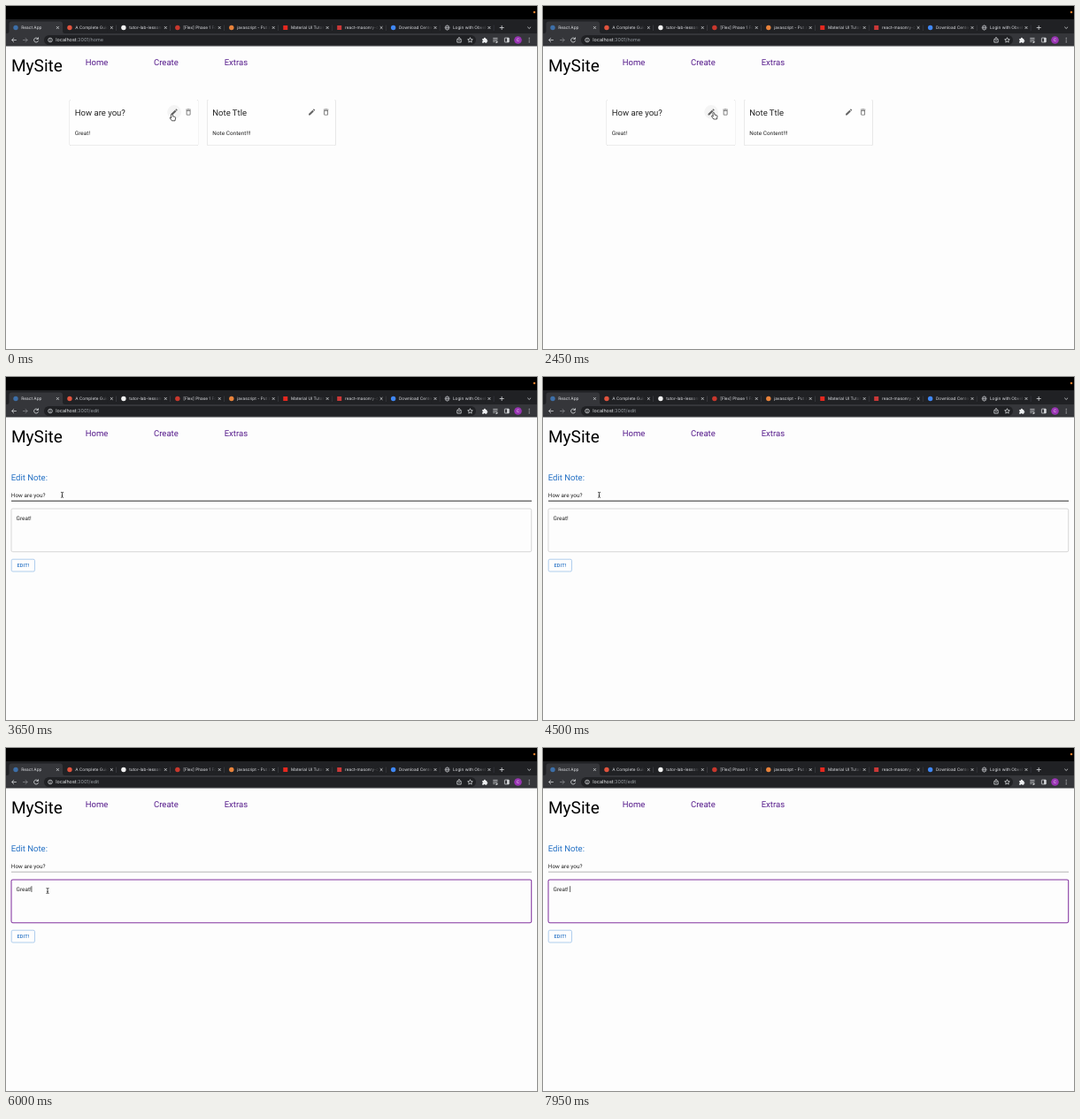
Animation of 600x388 px, one loop 8 s. Source, as an HTML page:

```html
<!DOCTYPE html>
<html lang="en">
<head>
<meta charset="utf-8">
<title>Notes</title>
<style>
  html, body { margin: 0; width: 100%; height: 100%; overflow: hidden; background: #fdfdfd; }
  svg { display: block; width: 600px; height: 388px; }
  text { font-family: Roboto, sans-serif; text-rendering: geometricPrecision; white-space: pre; }
  .ui { font-family: Inter, sans-serif; }
  .body { font-size: 6.35px; letter-spacing: .06px; fill: #222; }
  .line { fill: none; stroke: #d5d7da; stroke-width: .8; }
  .card { fill: #fefefe; filter: drop-shadow(0 .6px .45px rgba(0, 0, 0, .38)); }
</style>
</head>
<body>
<svg id="stage" viewBox="0 0 600 388">
  <defs>
    <linearGradient id="fade">
      <stop offset="0" stop-color="#202124" stop-opacity="0"/>
      <stop offset="1" stop-color="#202124"/>
    </linearGradient>
    <path id="pencil" transform="scale(.397) translate(-12 -12)" d="M3 17.25V21h3.75L17.81 9.94l-3.75-3.75L3 17.25zM20.71 7.04a1 1 0 0 0 0-1.41l-2.34-2.34a1 1 0 0 0-1.41 0l-1.83 1.83 3.75 3.75 1.83-1.83z"/>
    <path id="trash" transform="scale(.397) translate(-12 -12)" d="M6 19c0 1.1.9 2 2 2h8c1.1 0 2-.9 2-2V7H6v12zM8 9h8v10H8V9zm7.5-5l-1-1h-5l-1 1H5v2h14V4z"/>
    <path id="cross" d="M-1.4-1.4 1.4 1.4M1.4-1.4-1.4 1.4"/>
  </defs>

  <rect width="600" height="388" fill="#fdfdfd"/>
  <rect width="600" height="45.5" fill="#35363a"/>
  <rect width="600" height="31" fill="#202124"/>
  <rect width="600" height="15" fill="#000"/>
  <circle cx="597" cy="7" r="1.3" fill="#d9792b"/>
  <path d="M1 31Q3.5 31 3.5 28.5V20.5Q3.5 17.5 6.5 17.5H61Q64 17.5 64 20.5V28.5Q64 31 66.500 31Z" fill="#35363a"/>
  <g id="tabs"></g>
  <path class="line" d="M557.700 24.500h5M560.200 22v5M589.300 23.700l1.900 1.800 1.900-1.800"/>

  <g class="line">
    <path d="M11.800 38.500H6.700M9 36.100 6.600 38.500 9 40.900"/>
    <path d="M19 38.500h5.100M21.800 36.100l2.400 2.400-2.400 2.400" stroke="#85878b"/>
    <path d="M36 36.900a2.500 2.500 0 1 0 .5 2.300M36.500 35.400v2.100h-2.100"/>
  </g>
  <rect x="43" y="33" width="488" height="11" rx="5.500" fill="#202124"/>
  <g class="line" stroke-width=".7">
    <circle cx="50" cy="38.500" r="2.300"/>
    <path d="M50 38.100v1.700M50 36.900v.6"/>
    <path d="M511 37.500h-1.200v3.600h4.400v-3.600H513M512 39.700v-4.200M510.800 36.600l1.200-1.200 1.200 1.200"/>
    <path d="m524.500 35.700.8 1.900 2 .2-1.500 1.300.4 2-1.700-1-1.700 1 .4-2-1.500-1.300 2-.2z"/>
    <path d="M550.300 36.400h5.200M550.300 38.300h5.200M550.300 40.200h2.400"/>
    <rect x="563.400" y="36.100" width="4.800" height="4.800" rx=".4"/>
  </g>
  <path d="M553.600 39.200l2.600 1.500-2.600 1.500zM566.100 36h2.300v5h-2.300z" fill="#d5d7da"/>
  <path d="M538.200 37h1.700a1.050 1.050 0 1 1 2 0h1.400v1.500a1 1 0 1 1 0 2v1.300h-1.700a1 1 0 0 0-1.900 0h-1.500v-1.700a1 1 0 0 0 0-1.800z" fill="#eceef0"/>
  <circle cx="578.500" cy="38.500" r="4.300" fill="#9a35b4"/>
  <text class="ui" x="578.500" y="40.200" font-size="4.700" text-anchor="middle" fill="#f4e6f8">C</text>
  <path d="M591.200 36.300v.01M591.200 38.500v.01M591.200 40.700v.01" stroke="#d5d7da" stroke-width="1.200" stroke-linecap="round"/>
  <text class="ui" x="56.300" y="40.400" font-size="5.450" fill="#eceef0">localhost<tspan fill="#9aa0a6">:3001/<tspan id="route"></tspan></tspan></text>

  <text x="6" y="73.500" font-size="19.050">MySite</text>
  <g font-size="9.520" fill="#551a8b">
    <text x="89.700" y="67.300">Home</text>
    <text x="167" y="67.300">Create</text>
    <text x="246.700" y="67.300">Extras</text>
  </g>

  <g id="home">
    <circle id="hover" cy="120" r="7.900" fill="#000" fill-opacity=".04"/>
  </g>

  <g id="edit">
    <text x="5.800" y="117.200" font-size="9.520" fill="#2370c4">Edit Note:</text>
    <text class="body" x="5.800" y="136.400">How are you?</text>
    <path id="rule" d="M6 140.200H594"/>
    <rect id="box" x="6" y="149" width="587.700" height="48.700" rx="1.600" fill="none"/>
    <text class="body" x="11.500" y="162">Great!</text>
    <path id="caret" d="M0 156.200v6.800" stroke="#222" stroke-width=".7"/>
    <rect x="6.200" y="206.200" width="26.300" height="13.800" rx="1.600" fill="none" stroke="#8fb9e6" stroke-width=".7"/>
    <text x="19.400" y="214.900" font-size="5.560" font-weight="500" letter-spacing=".16" text-anchor="middle" fill="#2370c4">EDIT!</text>
  </g>

  <g id="cursor">
    <path id="hand" d="M-1.100.8Q-1-.2-.2-.2Q.5-.2.7.7L1 2.400 3.200 2.900Q4.200 3.200 4 4.200L3.400 7.300H-.2L-2.300 4.400Q-2.700 3.400-1.700 3.400L-.7 4.200Z" fill="#fff" stroke="#111" stroke-width=".7" stroke-linejoin="round"/>
    <path id="arrow" d="M0 0V6L1.400 4.800 2.300 6.900 3.400 6.400 2.500 4.400H4.300Z" fill="#000" stroke="#fff" stroke-width=".5"/>
    <path id="beam" d="M-1.500-3Q0-3 0-2.200Q0-3 1.500-3M0-2.300V2.300M-1.500 3Q0 3 0 2.200Q0 3 1.500 3M-.8.8H.8" fill="none" stroke="#111" stroke-width=".7"/>
  </g>
</svg>
<script>
const LOOP = 8000;
const OPEN_EDIT = 2800, FOCUS = 5650, TYPE_SPACE = 7600;
const $ = id => document.getElementById(id);

// title, icon colour, icon shape
const tabs = [
  ['React App', '#3d6fa8', 'dot'],
  ['A Complete Guide', '#e0533d', 'dot'],
  ['tutor-lab-lessons', '#f2f2f2', 'dot'],
  ['[Flex] Phase 1 Fol', '#c8372d', 'dot'],
  ['javascript - Put a', '#e8823a', 'dot'],
  ['Material UI Tutori', '#e5281f', 'square'],
  ['react-masonry-c', '#cb3837', 'square'],
  ['Download Center', '#3f87f5', 'dot'],
  ['Login with Obvel', '#c4c7cb', 'globe']
];

const icons = {
  dot: c => `<circle cx="11" cy="24.500" r="2.700" fill="${c}"/>`,
  square: c => `<rect x="8.500" y="22" width="5" height="5" fill="${c}"/>`,
  globe: c => `<g fill="none" stroke="${c}" stroke-width=".6"><circle cx="11" cy="24.500" r="2.500"/>
    <ellipse cx="11" cy="24.500" rx="1.100" ry="2.500"/><path d="M8.500 24.500h5"/></g>`
};

$('tabs').innerHTML = tabs.map(([title, color, shape], i) => `
  <svg x="${i * 60.95}" width="64" height="31">
    ${icons[shape](color)}
    <text class="ui" x="17.300" y="26.200" font-size="4.760" fill="#dfe1e5">${title}</text>
    ${i ? `<rect x="45" y="19" width="9" height="11" fill="url(#fade)"/>
    <rect x="54" y="19" width="10" height="11" fill="#202124"/>
    <path d="M63.700 21.500v6.500" stroke="#55575c" stroke-width=".5"/>` : ''}
    <use href="#cross" x="58.400" y="24.500" class="line"/>
  </svg>`).join('');

const card = (x, title, note) => `
  <rect class="card" x="${x}" y="106" width="145.300" height="51.800" rx="1.600"/>
  <text x="${x + 6}" y="123.500" font-size="9.520" fill="#222">${title}</text>
  <text class="body" x="${x + 6}" y="146.200">${note}</text>
  <g fill="#666"><use href="#pencil" x="${x + 118.3}" y="120"/><use href="#trash" x="${x + 134.3}" y="120"/></g>`;
$('hover').insertAdjacentHTML('beforebegin',
  card(71.8, 'How are you?', 'Great!') + card(227.3, 'Note Ttle', 'Note Content!!!'));

// pointer hot spot: time, x, y
const path = [
  [0, 187.6, 122.5], [250, 187.6, 122.5], [800, 198.8, 121.3], [1000, 198.8, 121.3],
  [1600, 193, 120.7], [2900, 193, 120.7], [3400, 63.5, 133.3], [4850, 63.5, 133.3],
  [5350, 56.3, 144.8], [5450, 56.3, 144.8], [5620, 47, 161.5], [LOOP, 47, 161.5]
];

function pointer(t) {
  const i = path.findIndex(p => p[0] > t);
  const [t0, x0, y0] = path[i - 1], [t1, x1, y1] = path[i];
  const k = (t - t0) / (t1 - t0), e = k * k * (3 - 2 * k);
  return [x0 + (x1 - x0) * e, y0 + (y1 - y0) * e];
}

const show = (id, on) => $(id).setAttribute('visibility', on ? 'visible' : 'hidden');
function stroke(id, color, width) {
  $(id).setAttribute('stroke', color);
  $(id).setAttribute('stroke-width', width);
}

function draw(t) {
  const editing = t >= OPEN_EDIT, focused = t >= FOCUS, typed = t >= TYPE_SPACE;
  const [x, y] = pointer(t);
  $('route').textContent = editing ? 'edit' : 'home';
  $('home').style.display = editing ? 'none' : '';
  $('edit').style.display = editing ? '' : 'none';
  $('hover').setAttribute('cx', x < 198 ? 190.1 : 206.1);

  const overInput = editing && y > 128 && y < 146;
  stroke('rule', overInput ? '#222' : '#949494', overInput ? .95 : .7);
  const overBox = y > 149;
  stroke('box', focused ? '#8435a0' : overBox ? '#222' : '#c6c6c6', focused ? 1.05 : .7);

  const since = t - (typed ? TYPE_SPACE : FOCUS);
  $('caret').setAttribute('transform', `translate(${typed ? 30.6 : 28.9} 0)`);
  $('caret').style.display = focused && since % 1000 < 500 ? '' : 'none';

  const beam = editing && (overBox || y > 128 && y < 140);
  $('cursor').setAttribute('transform', `translate(${x} ${y})`);
  show('hand', !editing);
  show('arrow', editing && !beam);
  show('beam', beam && !typed);
}

function tick() {
  draw(performance.now() % LOOP);
  requestAnimationFrame(tick);
}
tick();
</script>
</body>
</html>
```
